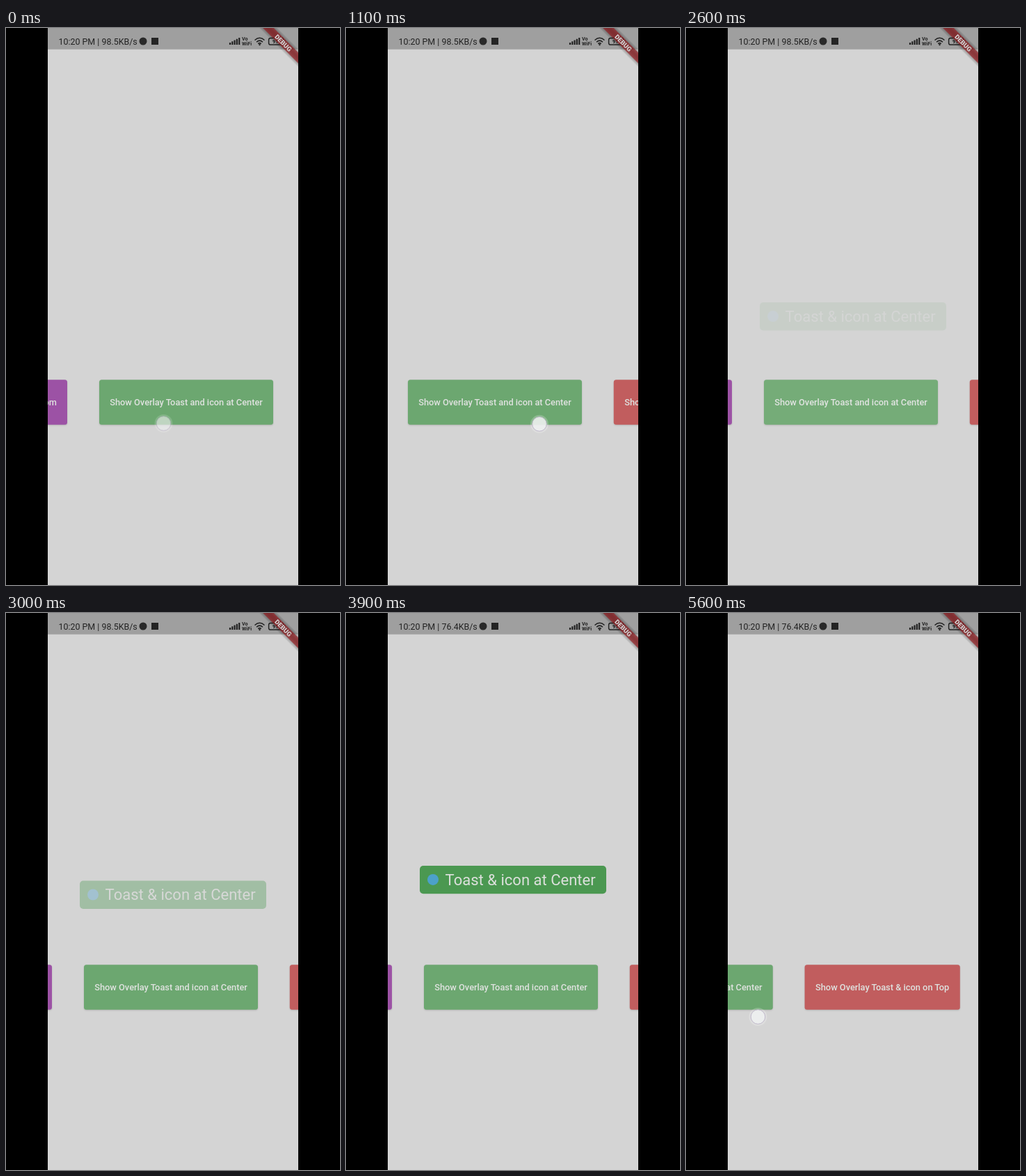
Animation of 480 by 800 pixels, one loop 5700 ms. Source, as an HTML page:

```html
<!DOCTYPE html>
<html lang="en">
<head>
<meta charset="utf-8">
<title>Overlay toast demo</title>
<style>
  html, body { margin: 0; width: 100%; height: 100%; overflow: hidden; background: #000; }
  svg { display: block; width: 100%; height: 100%; font-family: Roboto, sans-serif; }
  .status { font-size: 12.4px; fill: #222; }
  .small { font-size: 7.2px; font-weight: 700; fill: #222; }
  .button text { font-size: 12.8px; font-weight: 500; fill: #dfe2df; text-anchor: middle; }
  .toast text { font-size: 22.04px; fill: #dde1dd; }
  .line { fill: none; stroke: #222; stroke-width: 1.5; }
  .debug { font-size: 9.4px; font-weight: 900; fill: #d4d4d4; text-anchor: middle; }
</style>
</head>
<body>
<svg viewBox="0 0 480 800">
  <defs>
    <clipPath id="screen"><rect x="60" width="360" height="800"/></clipPath>
    <filter id="soft" x="-20%" y="-20%" width="140%" height="140%"><feGaussianBlur stdDeviation="1"/></filter>
    <filter id="blur" x="-30%" y="-30%" width="160%" height="160%"><feGaussianBlur stdDeviation="3.4"/></filter>
  </defs>
  <rect width="480" height="800"/>
  <g clip-path="url(#screen)">
    <rect x="60" width="360" height="800" fill="#d4d4d4"/>

    <g id="strip"></g>

    <g id="toast" class="toast">
      <rect x="106" width="268" height="40.4" rx="5" fill="#44954a"/>
      <circle cx="125" cy="20" r="8" fill="#459fc9"/>
      <text x="142.6" y="27.8">Toast &amp; icon at Center</text>
    </g>

    <rect x="60" width="360" height="30.7" fill="#9f9f9f"/>
    <g class="status">
      <text x="75.6" y="23.8">10:20 PM |</text>
      <text id="rate" x="137.6" y="23.8"></text>
    </g>
    <circle cx="197" cy="19" r="5.5" fill="#2a2a2a"/>
    <rect x="209" y="14" width="10" height="10" fill="#242424"/>
    <g id="bars" fill="#222"></g>
    <text class="small" x="339" y="18">Vo</text>
    <text class="small" x="339" y="25">WiFi</text>
    <path class="line" d="M357.5 17.5q7-6.4 14 0M360 20.2q4.5-4.2 9 0M362.3 22.6q2.2-2 4.4 0"/>
    <circle cx="364.5" cy="24" r="1.2" fill="#222"/>
    <rect class="line" x="377.6" y="14.4" width="21" height="9.6" rx="2.6"/>
    <path class="line" d="M400.6 17.4v3.6"/>
    <text class="small" x="383" y="22.2">91</text>

    <g transform="translate(398.5 21.5) rotate(45)">
      <rect x="-50" y="-5.5" width="100" height="11" opacity=".5" filter="url(#blur)"/>
      <rect x="-50" y="-5.5" width="100" height="11" fill="#98171b" opacity=".63"/>
      <text class="debug" y="3.4">DEBUG</text>
    </g>

    <g id="touch">
      <circle r="13" fill="#fff" opacity=".22"/>
      <circle r="10.3" fill="#eef0f0" fill-opacity=".88" stroke="#c0b9cb"/>
    </g>
  </g>
</svg>
<script>
  const LOOP = 5700, STEP = 100;
  const TOAST = { start: 2480, fade: 1500, end: 5500, low: 397, high: 361 };
  const $ = id => document.getElementById(id);

  // each gesture moves the finger and leaves the strip at a new place
  const gestures = [
    { start: 0,    end: 500,  strip: [134, 48],     x: [226.5, 140.5], y: [568, 568] },
    { start: 700,  end: 1700, strip: [48, 112],     x: [237, 301],     y: [565, 571] },
    { start: 2200, end: 2500, strip: [112, 112],    x: [262, 262],     y: [548, 548] },
    { start: 4843, end: 5700, strip: [112, -128.5], x: [332, 100.3],   y: [544, 580.5] }
  ];

  const clamp = v => Math.max(0, Math.min(1, v));
  const easeOut = p => 1 - (1 - p) ** 2;
  const mix = ([a, b], p) => a + (b - a) * p;
  const place = (id, x, y) => $(id).setAttribute('transform', `translate(${x} ${y})`);
  const fade = (id, v) => $(id).setAttribute('opacity', clamp(v));

  const button = (x, width, color, label) => `
    <g class="button" transform="translate(${x} 505.3)">
      <rect y="1" width="${width}" height="64.5" rx="3.5" opacity=".14" filter="url(#soft)"/>
      <rect width="${width}" height="64.5" rx="3.5" fill="${color}"/>
      <text x="${width / 2}" y="36.8">${label}</text>
    </g>`;

  $('strip').innerHTML =
    button(-300, 254, '#9c52a5', 'Show Overlay Toast and icon at Bottom') +
    button(0, 250, '#6ca770', 'Show Overlay Toast and icon at Center') +
    button(295.8, 223.2, '#c15d5e', 'Show Overlay Toast &amp; icon on Top') +
    '<rect id="glow" y="505.3" width="250" height="64.5" rx="3.5" fill="#fff"/>';

  for (let i = 0; i < 5; i++) {
    const h = 3 + i * 1.75;
    $('bars').innerHTML += `<rect x="${320.9 + i * 3.3}" y="${24 - h}" width="2.2" height="${h}"/>`;
  }

  function draw(t) {
    const g = gestures.findLast(({ start }) => start <= t);
    const p = easeOut(clamp((t - g.start) / (g.end - g.start)));
    place('strip', mix(g.strip, p), 0);
    place('touch', mix(g.x, p), mix(g.y, p));
    fade('touch', Math.min(0.7 + (t - g.start) / 1000, (g.end - t) / 100));

    fade('glow', 0.07 * Math.sin(Math.PI * clamp((t - 2200) / 600)));

    const shown = clamp((t - TOAST.start) / TOAST.fade);
    place('toast', 0, mix([TOAST.low, TOAST.high], shown));
    fade('toast', t < TOAST.end ? shown : 0);

    $('rate').textContent = t < 3700 ? '98.5KB/s' : '76.4KB/s';
  }

  // the screen refreshes ten times a second
  let start;
  function tick(now) {
    start ??= now;
    draw(Math.floor(((now - start + 15) % LOOP) / STEP) * STEP);
    requestAnimationFrame(tick);
  }
  draw(0);
  requestAnimationFrame(tick);
</script>
</body>
</html>
```
